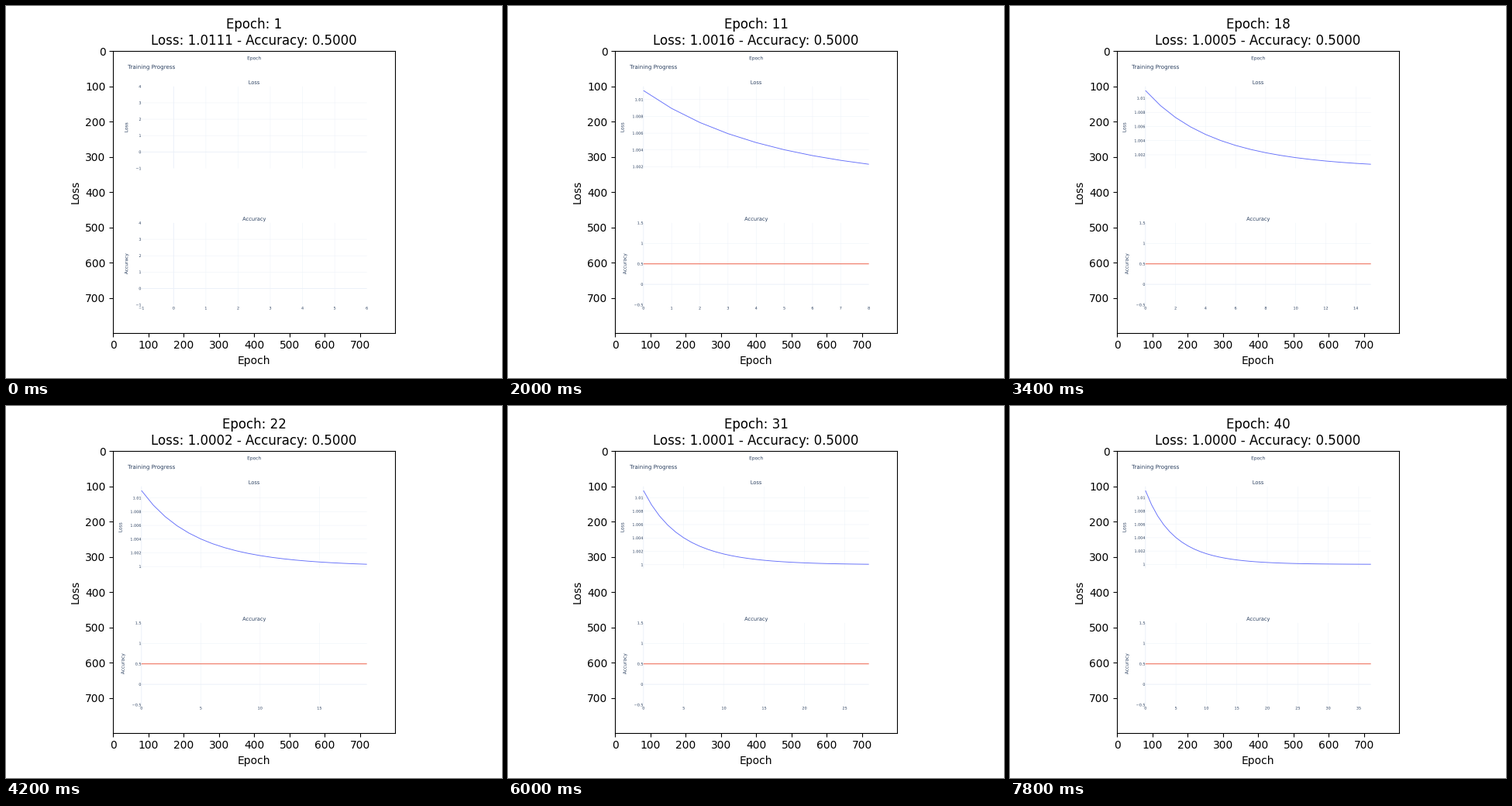
These frames come from a looping animation (640x480 px, 8000 ms). A matplotlib script:

```python
import math

import matplotlib.pyplot as plt
from matplotlib.animation import FuncAnimation
from matplotlib.patches import PathPatch
from matplotlib.textpath import TextPath
from matplotlib.transforms import Affine2D

EPOCHS = 40
INK, GRID = "#2a3f5f", "#ebf0f8"
BLUE, RED = "#636efa", "#ef553b"
LEFT, RIGHT = 80, 720
ROWS = [(100, 332.5), (487.5, 720)]
TICK_SIZE = 10.8

fig, ax = plt.subplots(figsize=(6.4, 4.8), dpi=100)
ax.set_aspect("equal")
ax.set_xlim(-0.5, 799.5)
ax.set_ylim(799.5, -0.5)
ax.set_xticks(range(0, 800, 100))
ax.set_yticks(range(0, 800, 100))
ax.set_xlabel("Epoch")
ax.set_ylabel("Loss")
ax.set_title("Epoch: 1\nLoss: 1.0111 - Accuracy: 0.5000")
fig.tight_layout()
ax.apply_aspect()

# points per inner chart unit
UNIT = ax.get_position().width * 640 / 800 * 0.72

parts = []


def loss_at(k):
    return 1 + 0.01108 * math.exp(-0.167 * k - 0.35 * (1 - math.exp(-k / 7)))


def text(x, y, s, size, align=0.5, rot=0):
    """Draw s with its baseline at y; align runs from 0 (left) to 1 (right)."""
    path = TextPath((0, 0), s, size=size)
    box = path.get_extents()
    move = Affine2D().translate(-box.x0 - align * box.width, 0)
    move.scale(1, -1).rotate_deg(rot).translate(x, y)
    patch = PathPatch(move.transform_path(path), fc=INK, lw=0, snap=False, zorder=2)
    parts.append(ax.add_artist(patch))


def line(xs, ys, color, width, z=1):
    parts.extend(ax.plot(xs, ys, color=color, lw=width * UNIT, snap=False,
                         solid_capstyle="butt", zorder=z))


def ticks(lo, hi, count):
    """Ticks at a round step of 2, 5 or 10 times a power of ten."""
    rough = (hi - lo) / count
    base = 10 ** math.floor(math.log10(rough) + 1e-9)
    step = base * next(m for m in (2, 5, 10) if m >= rough / base - 1e-9)
    first = math.ceil(lo / step - 1e-6)
    last = math.floor(hi / step + 1e-6)
    return [round(i * step, 6) for i in range(first, last + 1)]


def label(v):
    return f"{v:.6g}".replace("-", "\u2212")


def label_width(s):
    return 12 * (0.572 * len(s) - 0.306 * ("." in s))


def spread(values):
    """Value range of a chart row, with a 5% margin at each end."""
    if not values:
        return -1, 4
    lo, hi = min(values), max(values)
    if lo == hi:
        return lo - 1, hi + 1
    pad = (hi - lo) / 18
    return lo - pad, hi + pad


def chart(name, values, x_range, top, bottom, color):
    x0, x1 = x_range
    y0, y1 = spread(values)

    def px(v):
        return LEFT + (v - x0) / (x1 - x0) * (RIGHT - LEFT)

    def py(v):
        return bottom - (v - y0) / (y1 - y0) * (bottom - top)

    x_ticks = ticks(x0, x1, 9)
    y_ticks = ticks(y0, y1, (bottom - top) / 40 + 1)

    for v in x_ticks:
        if v == 0 or LEFT + 1 < px(v) < RIGHT - 1:
            line([px(v)] * 2, [top, bottom], GRID, 1 if v else 2)
    for v in y_ticks:
        if v == 0 or top + 1 < py(v) < bottom - 1:
            line([LEFT, RIGHT], [py(v)] * 2, GRID, 1 if v else 2)
        text(78.5, py(v) + 4, label(v), TICK_SIZE, align=1)

    if len(values) > 1:
        line([px(k) for k in range(len(values))], [py(v) for v in values],
             color, 2, z=1.5)

    widest = max(label_width(label(v)) for v in y_ticks)
    text(55 - widest, (top + bottom) / 2, name, 13, rot=-90)
    text(400, top - 6.5, name, 14.6)
    return [(px(v), label(v)) for v in x_ticks]


def draw(i):
    while parts:
        parts.pop().remove()
    ax.set_title(f"Epoch: {i + 1}\nLoss: {loss_at(i):.4f} - Accuracy: {0.5:.4f}")

    # the chart trails the title by two epochs
    n = max(i - 1, 0)
    if n == 0:
        x_range = (-1, 6)
    elif n == 1:
        x_range = (-1, 1)
    else:
        x_range = (0, n - 1)

    text(400, 24, "Epoch", 13)
    text(41, 50, "Training Progress", 15.8, align=0)
    chart("Loss", [loss_at(k) for k in range(n)], x_range, *ROWS[0], BLUE)
    for x, s in chart("Accuracy", [0.5] * n, x_range, *ROWS[1], RED):
        text(x, 733, s, TICK_SIZE)
    return parts


anim = FuncAnimation(fig, draw, frames=EPOCHS, interval=200, repeat=True,
                     repeat_delay=0, blit=False)
plt.show()
```
